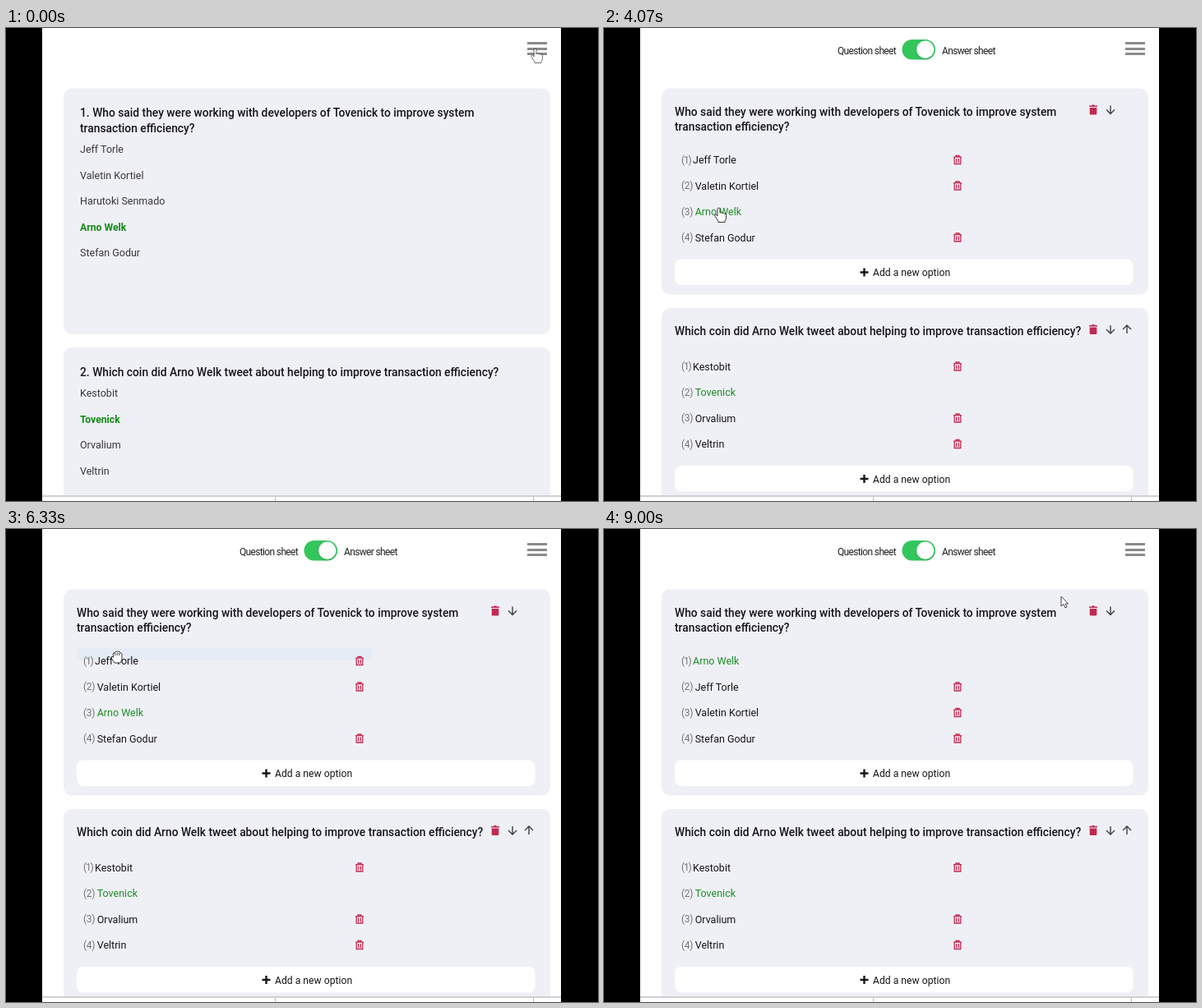
Recreate the animation shown at these times as an HTML page. Size 720 by 576 pixels, loop 9.14 s.

```html
<!DOCTYPE html>
<html lang="en">
<head>
<meta charset="utf-8">
<title>Quiz sheet editor</title>
<style>
  html, body { margin: 0; width: 100%; height: 100%; overflow: hidden; background: #000; }
  svg { display: block; width: 720px; height: 576px; font-family: Roboto, "Open Sans", sans-serif; }
  text { white-space: pre; }
  .title { font-size: 13.8px; font-weight: 500; fill: #16161a; }
  .view { font-size: 12.5px; fill: #383838; }
  .view.right { font-size: 12.2px; font-weight: 700; fill: #128a14; }
  .opt { font-size: 12.5px; fill: #161616; }
  .opt.right { fill: #1c8c24; }
  .num { font-size: 12px; letter-spacing: -.3px; fill: #757575; }
  .num.first { letter-spacing: -1.2px; }
  .add { font-size: 12.2px; fill: #161616; }
  .label { font-size: 12px; letter-spacing: -.65px; fill: #222; }
  .item { font-size: 11.7px; letter-spacing: .15px; }
</style>
</head>
<body>
<svg id="stage" viewBox="0 0 720 576" xmlns="http://www.w3.org/2000/svg">
  <defs>
    <filter id="soft" x="-20%" y="-20%" width="140%" height="150%">
      <feDropShadow dx="0" dy="1" stdDeviation="1.6" flood-opacity=".2"/>
    </filter>
    <clipPath id="menuClip"><rect x="505" y="42" width="157.5" height="96" rx="8"/></clipPath>
    <g id="bin" fill="none" stroke="#c2294f" stroke-width="1.3">
      <path d="M-5-3.4H5M-2-3.6V-5H2V-3.6M-3.8-3V5H3.8V-3M-1.4-1.4V3.4M1.4-1.4V3.4"/>
    </g>
    <path id="binSolid" fill="#c2294f" d="M-5-5H-2L-1.3-6H1.3L2-5H5V-3.4H-5ZM-4.3-2.6H4.3V5Q4.3 6 3.3 6H-3.3Q-4.3 6-4.3 5Z"/>
    <path id="down" fill="none" stroke="#3b4045" stroke-width="1.4" d="M0-5V5M-5 0L0 5L5 0"/>
    <path id="grip" fill="none" stroke="#666" stroke-width="1.4" d="M-5-4H5M-5 0H5M-5 4H5"/>
    <path id="arrow" fill="#fff" stroke="#333" stroke-width=".9" d="M0 0V12L3 9.5L5 14L7 13L5 9H8.6Z"/>
    <g id="faint" fill="none">
      <path stroke="#aaa" stroke-width=".8" d="M0 0L9 9"/>
      <path stroke="#333" stroke-width="1.2" stroke-dasharray="2 1" d="M1 13L3 11H6L7 14"/>
    </g>
    <path id="hand" fill="#fff" stroke="#222" stroke-width=".9"
      d="M-2 10V1.5a1.5 1.5 0 0 1 3 0V6q1.5-1 3 .5q1.5-.8 2.5.6q2-.5 2 1.4V12q0 2-1.5 4V17.5H-1V16L-4.5 11q-1.6-2 0-2.8q1.2-.2 2.5 1.8Z"/>
    <g id="grab" fill="#fff" stroke="#222" stroke-width=".9">
      <path d="M-4.5 0L-4.8-3.5q0-2 2-1.8q.4-1.8 2.2-1.4q1.2-1 2.4.2q2-.4 2.2 1.4q2 0 2 2V1.5q0 3-2 5.5H-3L-6.3 2q-1.2-2 .3-2.6Z"/>
      <path d="M-2.3-5V-2M.2-5.5V-2M2.7-5V-2" fill="none"/>
    </g>
  </defs>
  <g id="scene"></g>
</svg>
<script>
const STEP = 1000 / 15, LOOP = 9140;
const scene = document.getElementById('scene');

const ANSWER = 'Arno Welk', COIN = 'Tovenick';
const people = ['Jeff Torle', 'Valetin Kortiel', 'Harutoki Senmado', ANSWER, 'Stefan Godur'];
const coins = ['Kestobit', COIN, 'Orvalium', 'Veltrin'];
const titleA = [`Who said they were working with developers of ${COIN} to improve system`, 'transaction efficiency?'];
const titleB = [`Which coin did ${ANSWER} tweet about helping to improve transaction efficiency?`];

// Steps (fifteenths of a second) at which the interface changes
const at = {
  open: 4, hover: 9, close: 19, edit: 31, aim: 44, remove: 54, grip: 64, grab: 68,
  drag: 70, drop: 93, reorder: 97, open2: 114, cross: 118, close2: 125
};

// Pointer: step, x, y
const path = [
  [0, 644, 25], [8, 644, 25], [11, 555, 62], [12, 555, 62], [13, 547, 58], [30, 547, 58],
  [44, 431, 227], [53, 431, 227], [58, 150, 220], [60, 150, 220], [61, 140, 219], [63, 140, 219],
  [64, 131, 217], [69, 130, 217], [75, 132, 199], [83, 134, 160], [90, 135, 156], [95, 135, 156],
  [104, 636, 70], [107, 636, 70], [111, 645, 26], [116, 645, 26], [118, 586, 66],
  [122, 548, 80], [132, 548, 80], [135, 556, 82], [140, 556, 82]
];
const shapes = [[0, 'hand'], [24, 'faint'], [31, 'arrow'], [43, 'hand'], [58, 'arrow'], [61, 'hand'],
  [at.grab, 'grab'], [98, 'arrow'], [110, 'hand'], [126, 'arrow']];

const clamp = v => Math.max(0, Math.min(1, v));
const mix = (a, b, k) => `rgb(${a.map((v, i) => Math.round(v + (b[i] - v) * k))})`;
const text = (cls, x, y, s, more = '') => `<text class="${cls}" x="${x}" y="${y}" ${more}>${s}</text>`;
const rect = (x, y, w, h, fill, r = 0, more = '') =>
  `<rect x="${x}" y="${y}" width="${w}" height="${h}" rx="${r}" fill="${fill}" ${more}/>`;
const use = (id, x, y, more = '') => `<use href="#${id}" transform="translate(${x} ${y}) ${more}"/>`;
const card = (y, h) => rect(70, y, 592, h, '#eff0f6', 10);
const heading = (x, y, lines) => lines.map((s, i) => text('title', x, y + i * 18.5, s)).join('');
const isRight = name => name === ANSWER || name === COIN;
const mark = name => isRight(name) ? ' right' : '';

function pointerAt(n) {
  const i = path.findIndex(p => p[0] > n);
  const [a, b] = [path[i - 1], path[i]];
  const k = (n - a[0]) / (b[0] - a[0]);
  return { x: a[1] + (b[1] - a[1]) * k, y: a[2] + (b[2] - a[2]) * k };
}

function viewCard(y, h, title, names) {
  const first = y + 60 + 18.5 * (title.length - 1);
  return card(y, h) + heading(90, y + 34.5, title)
    + names.map((s, i) => text('view' + mark(s), 90, first + i * 31.5, s)).join('');
}

function editCard(y, title, names, opts = {}) {
  const first = y + (title.length > 1 ? 87 : 71);
  const foot = first - 5 + names.length * 31.5;
  const iconY = y + 26;
  let out = card(y, foot + 43 - y) + (opts.zone || '') + heading(86, y + 33.3, title)
    + use('binSolid', 595, iconY) + use('down', 616, iconY);
  if (opts.up) out += use('down', 636, iconY, 'rotate(180)');
  names.forEach((s, i) => {
    const cy = first + i * 31.5;
    if (opts.hidden === s) return;
    out += opts.grip === s ? use('grip', 102, cy) : text(i ? 'num' : 'num first', 94, cy + 4.3, `(${i + 1})`);
    out += text('opt' + mark(s), i ? 110.7 : 108, cy + 4.5, s);
    if (!isRight(s)) out += `<g opacity="${opts.hover === s ? .55 : 1}">${use('bin', 430, cy)}</g>`;
  });
  return out + rect(86, foot, 557.5, 31.5, '#fff', 8)
    + `<path d="M311.5 ${foot + 16}h10m-5-5v10" stroke="#161616" stroke-width="2.4"/>`
    + text('add', 327, foot + 20.5, 'Add a new option');
}

function toggle() {
  return text('label', 284, 31.5, 'Question sheet') + text('label', 411, 31.5, 'Answer sheet')
    + rect(362.5, 14, 40.5, 24.5, '#34c65c', 12.2)
    + '<circle cx="390.8" cy="26.2" r="10.6" fill="#fff" filter="url(#soft)"/>';
}

function menu(n) {
  const levels = n < at.edit
    ? [clamp((n - at.hover) / 2), 0, 0, 0]
    : [Math.max(0, .5 - Math.abs(n - at.cross) * .25), clamp((n - at.cross) / 2), 0, 0];
  const rows = ['Edit', 'Save', 'Copy as text', 'Print'].map((s, i) => {
    const y = 42 + i * 24, k = levels[i];
    return rect(505, y, 158, 24, mix([239, 240, 246], [45, 45, 45], k))
      + text('item', 521, y + 16.6, s, `fill="${mix([68, 68, 68], [255, 255, 255], k)}"`);
  }).join('');
  const fade = n === at.close || n === at.close2 ? .5 : 1;
  return `<g opacity="${fade}">${rect(505, 42, 157.5, 96, '#eff0f6', 8, 'filter="url(#soft)"')}`
    + `<g clip-path="url(#menuClip)">${rows}</g></g>`;
}

// The drop zone fills the upper half of the nearest slot
function dropZone(n, p) {
  if (n < at.drag || n >= at.reorder) return '';
  const slot = Math.round((p.y - 144.5) / 31.5);
  const alpha = n < at.drop ? 1 : clamp((at.reorder - 1.2 - n) / 4);
  return rect(86, 144.3 + slot * 31.5, 360, 15.7, '#c0daf2', 4, `opacity="${alpha}"`);
}

function editor(n, p) {
  let names = people;
  if (n >= at.remove) names = names.filter((s, i) => i !== 2);
  if (n >= at.reorder) names = [ANSWER, ...names.filter(s => s !== ANSWER)];
  const dragging = n >= at.drag && n < at.drop;

  let out = toggle() + editCard(73.5, titleA, names, {
    hover: n >= at.aim && n < at.remove ? people[2] : '',
    grip: n >= at.grip && n < at.drag ? ANSWER : '',
    hidden: dragging ? ANSWER : '',
    zone: dropZone(n, p)
  });
  if (dragging) out += use('grip', p.x - 30, p.y + 6) + text('opt right', p.x - 19.2, p.y + 10.5, ANSWER);
  return out + editCard(215 + names.length * 31.5, titleB, coins, { up: true });
}

function menuIcon(cross) {
  const d = cross
    ? 'M637.5 16.5L654.5 33.5M654.5 16.5L637.5 33.5'
    : 'M634 18.5H658M634 25.5H658M634 31.5H658';
  return `<path fill="none" stroke="#8b8b8b" stroke-width="3" d="${d}"/>`;
}

function frame() {
  return rect(44, 571, 631, 5, '#fff') + rect(44, 569, 631, 2, '#d0d0d3')
    + rect(327, 571, 1, 5, '#bbb') + rect(641, 571, 1, 5, '#bbb')
    + rect(0, 0, 44, 576, '#000') + rect(675, 0, 45, 576, '#000');
}

function draw(n) {
  const p = pointerAt(n);
  const within = (from, to) => n >= from && n < to;
  const sheet = n < at.edit
    ? viewCard(73.5, 299.5, ['1. ' + titleA[0], titleA[1]], people) + viewCard(389, 260, ['2. ' + titleB[0]], coins)
    : editor(n, p);
  let out = rect(44, 0, 631, 576, '#fff') + sheet + frame()
    + menuIcon(within(at.open, at.close) || within(at.open2, at.close2));
  if (within(at.open, at.close + 1) || within(at.open2, at.close2 + 1)) out += menu(n);
  const shape = shapes.filter(s => s[0] <= n).pop()[1];
  scene.innerHTML = out + `<g opacity="${n === 0 ? .7 : 1}">${use(shape, p.x, p.y)}</g>`;
}

let last = -1;
function tick(now) {
  const n = Math.floor((now % LOOP + 3.4) / STEP);
  if (n !== last) draw(last = n);
  requestAnimationFrame(tick);
}
draw(0);
requestAnimationFrame(tick);
</script>
</body>
</html>
```
